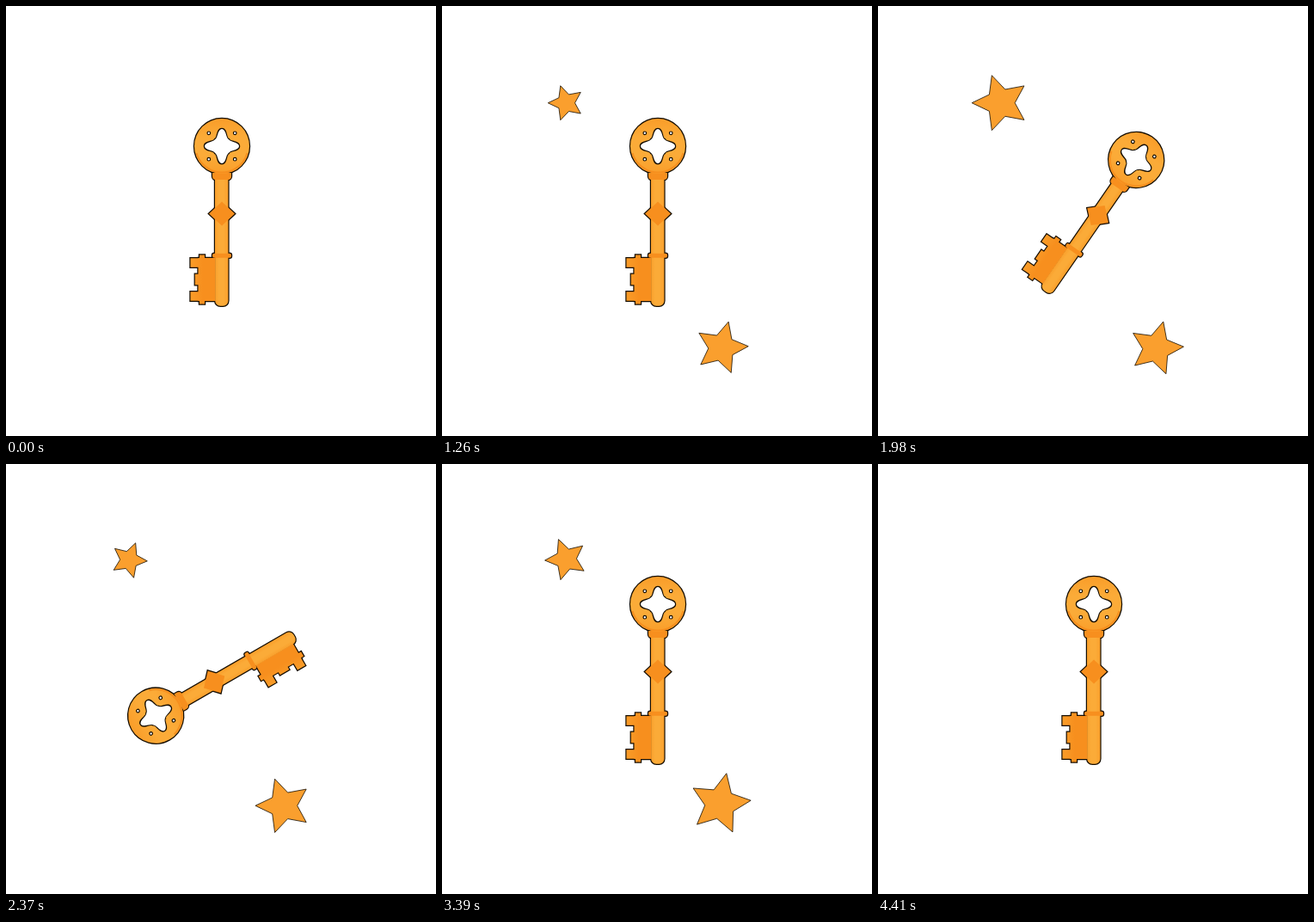
An HTML page with a canvas that plays this animation: 500x500 px, repeating every 4.53 s.

```html
<!DOCTYPE html>
<html lang="en">
<head>
<meta charset="utf-8">
<title>Key and stars</title>
<style>
  html, body { margin: 0; width: 100%; height: 100%; overflow: hidden; background: #fff; }
  canvas { display: block; width: 100vmin; height: 100vmin; }
</style>
</head>
<body>
<canvas width="500" height="500"></canvas>
<script>
const ctx = document.querySelector('canvas').getContext('2d');
const LOOP = 4530, STEP = 30, LAST = 4410, TAU = Math.PI * 2;
const INK = '#140c00', LIGHT = '#fbab38', MID = '#f99d29', DEEP = '#f78f1e';

const clamp = x => Math.max(0, Math.min(1, x));
const rad = deg => deg * Math.PI / 180;

function shade(x0, y0, x1, y1, ...colors) {
  const g = ctx.createLinearGradient(x0, y0, x1, y1);
  colors.forEach((c, i) => g.addColorStop(i / (colors.length - 1), c));
  return g;
}

function shape(draw) {
  const path = new Path2D();
  draw(path);
  return path;
}

const block = (x, y, w, h, radii = 0) => shape(p => p.roundRect(x, y, w, h, radii));

// Four rounded arms joined by small bulges on the diagonals.
function quatrefoil(path, x, y, reach) {
  const valley = reach * 0.42;
  for (let i = 0; i < 4; i++) {
    const c = Math.cos(i * Math.PI / 2), s = Math.sin(i * Math.PI / 2);
    const at = (u, v) => [x + u * c - v * s, y + u * s + v * c];
    if (!i) path.moveTo(...at(-valley, -valley));
    path.bezierCurveTo(...at(-reach / 4, -valley), ...at(-reach / 3, -reach), ...at(0, -reach));
    path.bezierCurveTo(...at(reach / 3, -reach), ...at(reach / 4, -valley), ...at(valley, -valley));
  }
  path.closePath();
}

const bow = shape(p => {
  const x = 251, y = 163;
  p.arc(x, y, 32, 0, TAU);
  p.closePath();
  quatrefoil(p, x, y, 21.2);
  for (let i = 0; i < 4; i++) {
    const a = (i + 0.5) * Math.PI / 2;
    const hx = x + 21.5 * Math.cos(a), hy = y + 21.5 * Math.sin(a);
    p.moveTo(hx + 2.4, hy);
    p.arc(hx, hy, 2.4, 0, TAU);
  }
});

const bowShadow = shape(p => p.arc(251, 163, 30.5, rad(15), rad(165)));

const diamond = shape(p => {
  for (let i = 0; i < 4; i++) {
    const a = i * Math.PI / 2;
    p.lineTo(251 + 15 * Math.cos(a), 241.5 + 14 * Math.sin(a));
  }
  p.closePath();
});

// The bit is symmetric about y = 318.
const bit = shape(p => {
  const bar = (x, w, half, y = 318) => p.rect(x, y - half, w, half * 2);
  bar(223.5, 20, 25);
  bar(225, 6, 28.5);
  bar(219.8, 5, 6.2);
  for (const side of [-1, 1]) bar(214.5, 10, 5.2, 318 + side * 19.5);
});

const shaftFill = shade(242, 0, 259, 0, MID, LIGHT, LIGHT, MID);
const parts = [
  [bit, shade(214, 0, 244, 0, MID, DEEP, DEEP), 'nonzero'],
  [block(243, 198, 15.4, 92), shaftFill],
  [block(243.2, 290, 15.2, 58.8, [0, 0, 6, 6]), shaftFill],
  [block(240, 194, 22, 8, [0, 0, 4, 4]), DEEP],
  [bow, shade(0, 131, 0, 196, MID, LIGHT, LIGHT, MID)],
  [block(240, 287.8, 22, 5, 2), DEEP],
  [diamond, DEEP]
];

// Outlining everything before filling leaves ink on the silhouette only.
function drawKey(t) {
  const p = clamp((t - 1788) / 957);
  ctx.save();
  ctx.translate(250, 250);
  ctx.rotate(Math.PI * (1 - Math.cos(Math.PI * p)));
  ctx.translate(-250, -250);
  ctx.strokeStyle = INK;
  ctx.lineWidth = 2.4;
  for (const [path] of parts) ctx.stroke(path);
  for (const [path, fill, rule = 'evenodd'] of parts) {
    ctx.fillStyle = fill;
    ctx.fill(path, rule);
  }
  ctx.strokeStyle = DEEP;
  ctx.lineWidth = 2;
  ctx.stroke(bowShadow);
  ctx.restore();
}

const stars = [
  { x: 144, y: 111.8, angle: 36, mean: 28.3, swing: 7.3, peak: 1840, period: 1165,
    scale: t => clamp(t / 400) * clamp((4290 - t) / 590) },
  { x: 323.9, y: 396.5, angle: -3, mean: 28.6, swing: 7.8, peak: 2185, period: 1150,
    scale: t => clamp((t - 120) / 350) * Math.pow(clamp((LAST - t) / 330), 0.4) }
];

// Each star pulses while it spins around a slightly off-centre pivot.
function drawStar(star, t) {
  const pulse = Math.cos((t - star.peak) / star.period * TAU);
  const radius = (star.mean + star.swing * pulse) * star.scale(t);
  if (radius < 0.5) return;
  const turn = rad(star.angle + 0.1 * (t - 1980));
  const drift = turn + rad(110);
  const x = star.x + radius * 0.045 * Math.cos(drift);
  const y = star.y + radius * 0.045 * Math.sin(drift);
  ctx.beginPath();
  for (let i = 0; i < 10; i++) {
    const r = i % 2 ? radius * 0.49 : radius;
    const a = turn + i * Math.PI / 5;
    ctx.lineTo(x + r * Math.cos(a), y + r * Math.sin(a));
  }
  ctx.closePath();
  ctx.fillStyle = '#fa9f2e';
  ctx.fill();
  ctx.strokeStyle = INK;
  ctx.lineWidth = 0.8;
  ctx.stroke();
}

function render(now) {
  const t = Math.min(LAST, Math.floor((now % LOOP) / STEP) * STEP);
  ctx.fillStyle = '#fff';
  ctx.fillRect(0, 0, 500, 500);
  drawKey(t);
  stars.forEach(star => drawStar(star, t));
}

let start;
function tick(now) {
  start ??= now;
  render(now - start);
  requestAnimationFrame(tick);
}
render(0);
requestAnimationFrame(tick);
</script>
</body>
</html>
```
